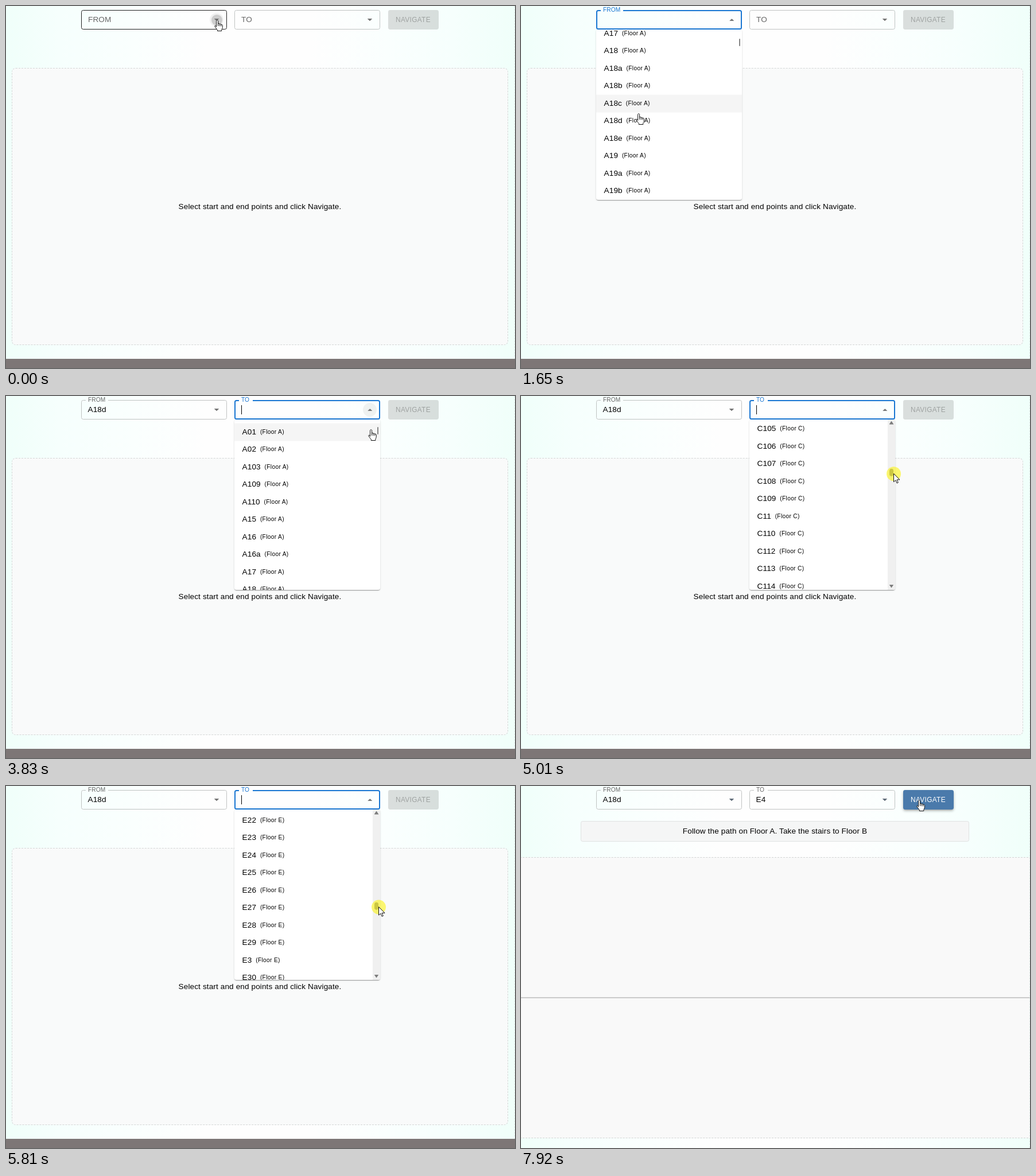
These frames come from a looping animation (887 px wide and 631 px high, 7.99 s). An HTML page:

```html
<!DOCTYPE html>
<html lang="en">
<head>
<meta charset="utf-8">
<title>Floor navigation</title>
<style>
  html, body { margin: 0; width: 100%; height: 100%; overflow: hidden; }
  body {
    position: relative;
    font: 13.56px/20px "Liberation Sans", Arial, sans-serif;
    letter-spacing: .127px;
    color: #000;
    background: linear-gradient(90deg, #f0fffa 0, #f6fffd 92px, #fafffe 220px, #fefefe 350px, #fefefe 530px, #fafffe 665px, #f6fffd 780px, #f0fffa 887px);
  }
  body * { position: absolute; box-sizing: border-box; white-space: nowrap; }
  [hidden] { display: none !important; }
  .edge { left: 886px; top: 0; height: 631px; border-left: 1px dashed #dde8e5; }
  .stage {
    left: 10px; top: 108px; width: 865px; height: 483px;
    border: 1px dashed #d4d6d6; border-radius: 7px; background: #f9fafa;
  }
  .stage p { margin: 0; left: 0; right: 0; top: 231px; text-align: center; }
  .foot { left: 0; top: 615px; width: 887px; height: 16px; background: #7d7676; }
  .route {
    left: 104px; top: 61px; width: 677px; height: 36px; line-height: 34px; text-align: center;
    background: #f5f6f6; border: 1px solid #e0e2e2; border-radius: 3.4px;
  }
  .map {
    left: -2px; top: 124px; width: 891px; height: 490px;
    background: #f9f9f9; border: 1px dashed #d2d4d4;
  }
  .map i { left: 0; top: 243px; width: 100%; height: 2px; background: #cbcbcb; }

  .field { top: 7px; width: 254px; height: 34px; }
  .box { inset: 0; border: 1px solid #c0c3c2; border-radius: 3.5px; }
  .hover .box { border-color: #212121; }
  .focus .box { border: 2px solid #1976d2; }
  .notch .box {
    clip-path: polygon(0 0, 8px 0, 8px 4px, var(--gap) 4px, var(--gap) 0, 100% 0, 100% 100%, 0 100%);
  }
  .label { left: 12px; top: 7px; transform-origin: 0 50%; color: #666; }
  .focus .label { color: #1976d2; }
  .value { left: 11.5px; top: 7px; }
  .caret { top: 9px; width: 1px; height: 16px; background: #000; }
  .halo, .ripple { border-radius: 50%; }
  .halo { left: 224px; top: 5px; width: 24px; height: 24px; background: rgba(0,0,0,.05); }
  .ripple { left: 226.5px; top: 7.5px; width: 19px; height: 19px; background: rgba(0,0,0,.15); }
  .tri { left: 231.7px; top: 15px; width: 8.6px; height: 4.3px; background: #757575; clip-path: polygon(0 0, 100% 0, 50% 100%); }
  .open .tri { transform: scaleY(-1); }
  .done .tri { background: #5f6b78; }

  .go {
    left: 665.5px; top: 7px; width: 88px; height: 34px; line-height: 34px; text-align: center;
    font-size: 11.87px; letter-spacing: .34px; border-radius: 3.4px;
    background: rgba(0,0,0,.13); color: rgba(0,0,0,.27);
  }
  .go.on {
    background: #4a7aab; color: #fff;
    box-shadow: 0 2px 3px -1px rgba(0,0,0,.2), 0 3px 4px rgba(0,0,0,.14), 0 1px 6px rgba(0,0,0,.1);
  }

  .list {
    top: 41px; width: 254px; height: 297px; overflow: hidden; background: #fff; border-radius: 3.4px;
    box-shadow: 0 2px 1px -1px rgba(0,0,0,.2), 0 1px 1px rgba(0,0,0,.14), 0 1px 3px rgba(0,0,0,.14);
  }
  .row { left: 0; top: 0; width: 254px; height: 30.5px; padding-left: 13.6px; display: flex; align-items: center; }
  .row.hot { background: #f5f5f5; }
  .row * { position: static; }
  .row small { margin-left: 6.8px; font-size: 10.17px; letter-spacing: .339px; }
  .bar { right: 0; top: 0; width: 13px; height: 297px; }
  .bar.wide { background: #f0f0f0; }
  .bar u { display: none; left: 2.5px; width: 8px; height: 6px; background: #7c7c7c; }
  .bar.wide u { display: block; }
  .up { top: 2.5px; clip-path: polygon(0 100%, 50% 0, 100% 100%); }
  .down { top: 287.5px; clip-path: polygon(0 0, 100% 0, 50% 100%); }
  .thumb { left: 8px; top: 0; width: 2px; height: 12.5px; border-radius: 1px; background: #868686; }
  .wide .thumb { left: 3px; width: 7px; border-radius: 3.5px; }

  .press { left: -12px; top: -12px; width: 25px; height: 25px; border-radius: 50%; background: rgba(252,244,20,.6); }
  #pointer { left: 0; top: 0; }
  #pointer svg { overflow: visible; fill: #fff; stroke: #111; stroke-linejoin: round; stroke-linecap: round; width: 16px; height: 21px; }
  #hand { left: -5px; top: 0; }
  #arrow { left: 0; top: 0; }
</style>
</head>
<body>
<div class="edge"></div>
<div id="idle">
  <div class="stage"><p>Select start and end points and click Navigate.</p></div>
  <div class="foot"></div>
</div>
<div id="result" hidden>
  <div class="route">Follow the path on Floor A. Take the stairs to Floor B</div>
  <div class="map"><i></i></div>
  <div class="edge"></div>
</div>
<div class="go" id="go">NAVIGATE</div>
<div class="list" id="list" hidden>
  <div class="bar" id="bar"><u class="up"></u><u class="down"></u><div class="thumb" id="thumb"></div></div>
</div>
<div id="pointer">
  <div class="press" id="press"></div>
  <svg id="hand" viewBox="0 0 16 21">
    <path d="M3.6 12V2.2C3.6.2 6.6.2 6.6 2.2V7C7 6 9.2 6.2 9.2 7.7 9.8 6.8 11.7 7.1 11.8 8.5 12.5 7.8 14.3 8.2 14.3 9.8V13.3C14.3 15 13 16.2 12.8 17.4V19.5H5.3V17.6C4 16.2 2.2 13.7.9 11.8.2 10.6 1.5 9.6 2.5 10.6Z"/>
    <path fill="none" d="M6.6 7V10.5M9.2 7.7V10.8M11.8 8.5V11"/>
  </svg>
  <svg id="arrow" viewBox="0 0 16 21">
    <path d="M.5.5V14.6L3.8 11.6 6.1 16.8 8.3 15.8 6 10.8H10.6Z"/>
  </svg>
</div>
<script>
const LOOP = 7990, ROW = 30.5, PAD = 6.5, VIEW = 297, TOP = 41;
const $ = id => document.getElementById(id);
const within = (t, a, b) => t >= a && t < b;
const clamp = v => Math.min(1, Math.max(0, v));
const smooth = v => v * v * (3 - 2 * v);

// Room names: plain string order, floor by floor
const count = (floor, from, to) =>
  Array.from({ length: to - from + 1 }, (_, i) => floor + (from + i));
const rooms = [
  ..."A01 A02 A103 A109 A110 A15 A16 A16a A17 A18 A18a A18b A18c A18d A18e A19 A19a A19b D2a".split(" "),
  ...count("A", 2, 9), ...count("A", 20, 99), ...count("B", 1, 90),
  ...count("C", 1, 138).filter(r => r !== "C111"),
  ...count("D", 1, 57), ...count("E", 1, 110), ...count("F", 1, 115), ...count("G", 1, 115)
].sort();
const maxScroll = rooms.length * ROW + 2 * PAD - VIEW;
const scrollTo = (room, y) => TOP + PAD + (rooms.indexOf(room) + .5) * ROW - y;

const path = [
  [0, 368, 24], [250, 368, 24], [450, 386, 44], [820, 300, 150], [1150, 212, 180],
  [1580, 205, 183], [1650, 205, 187], [1720, 205, 187], [1850, 208, 193], [2050, 208, 193],
  [2260, 205, 189], [2460, 205, 189], [2880, 636, 21], [3560, 636, 21], [3830, 636, 58],
  [3970, 636, 58], [4300, 649, 62], [4580, 649, 62], [5010, 649, 135], [5410, 649, 186],
  [5900, 649, 216], [6150, 630, 224], [6500, 510, 222], [6820, 463, 197], [7130, 463, 197],
  [7680, 694, 24], [LOOP, 694, 24]
];
const drag = [
  [4580, 0], [5010, scrollTo("C105", 69)], [5410, scrollTo("D26", 73.5)], [5900, scrollTo("E36", 74.5)]
];
const presses = [[60, 200], [2050, 2120], [3490, 3600], [4580, 5960], [7030, 7100], [7710, 7850]];

function sample(keys, t, ease = v => v) {
  let i = 0;
  while (i < keys.length - 2 && t >= keys[i + 1][0]) i++;
  const a = keys[i], b = keys[i + 1];
  const k = ease(clamp((t - a[0]) / (b[0] - a[0])));
  return a.slice(1).map((v, n) => v + (b[n + 1] - v) * k);
}
const pointerAt = t => sample(path, Math.max(0, t), within(t, 4580, 5900) ? undefined : smooth);
const wheel = t => [890, 1100, 1310].reduce((s, at) => s + 86.3 * smooth(clamp((t - at) / 160)), 0);

function makeField(name, left, gap) {
  const el = document.createElement("div");
  el.className = "field";
  el.style.left = left + "px";
  el.style.setProperty("--gap", gap + "px");
  const parts = { el };
  for (const part of ["box", "halo", "ripple", "tri", "label", "value", "caret"]) {
    parts[part] = el.appendChild(document.createElement("div"));
    parts[part].className = part;
  }
  parts.label.textContent = name;
  document.body.insertBefore(el, $("go"));
  return parts;
}

function drawField(f, s) {
  for (const c of ["hover", "focus", "open", "done"]) f.el.classList.toggle(c, !!s[c]);
  f.el.classList.toggle("notch", s.lift > 0);
  const k = 1 - (1 - s.lift) ** 3;
  f.label.style.transform = `translateY(${-17.3 * k}px) scale(${1 - .25 * k})`;
  f.value.textContent = s.value;
  f.caret.hidden = !s.focus || (s.t - s.blink) % 1060 >= 530;
  f.caret.style.left = (s.value ? 44 : 12) + "px";
  f.halo.hidden = !s.halo;
  f.ripple.hidden = !s.ripple;
}

const fromField = makeField("FROM", 131, 47);
const toField = makeField("TO", 398, 32);
const rows = Array.from({ length: 11 }, () => {
  const el = document.createElement("div");
  el.className = "row";
  el.append(document.createElement("span"), document.createElement("small"));
  $("list").insertBefore(el, $("bar"));
  return el;
});

function drawList(t, fromOpen, toOpen) {
  $("list").hidden = !fromOpen && !toOpen;
  if ($("list").hidden) return;
  const scroll = fromOpen ? wheel(t) : sample(drag, t)[0];
  const wide = within(t, 4240, 6080);
  const [px, py] = pointerAt(t - 70);
  const inside = py > TOP && !(wide && px > 639);
  const hot = inside ? Math.floor((py - TOP - PAD + scroll) / ROW) : -1;
  const first = Math.max(0, Math.floor((scroll - PAD) / ROW));
  $("list").style.left = (fromOpen ? 131 : 398) + "px";
  rows.forEach((el, i) => {
    const n = first + i, room = rooms[n];
    el.firstChild.textContent = room;
    el.lastChild.textContent = `(Floor ${room[0]})`;
    el.style.transform = `translateY(${PAD + n * ROW - scroll}px)`;
    el.classList.toggle("hot", n === hot);
  });
  $("bar").classList.toggle("wide", wide);
  $("thumb").style.transform = `translateY(${13 + 258 * scroll / maxScroll}px)`;
}

function draw(t) {
  const done = t >= 7850;
  const fromOpen = within(t, 200, 2120), toOpen = within(t, 3620, 7100);
  drawField(fromField, {
    t, done, open: fromOpen, hover: t < 60, focus: within(t, 60, 3490),
    lift: clamp((t - 60) / 200), value: t < 2120 ? "" : "A18d",
    blink: t < 2120 ? 40 : 2120, halo: t < 420, ripple: t < 250
  });
  drawField(toField, {
    t, done, open: toOpen, hover: within(t, 2760, 3490), focus: within(t, 3490, 7850),
    lift: clamp((t - 3490) / 200), value: t < 7100 ? "" : "E4",
    blink: t < 7100 ? 3490 : 7100, halo: within(t, 2800, 3970), ripple: within(t, 3490, 3700)
  });
  // The caret after the short room name sits closer to the left
  if (t >= 7100) toField.caret.style.left = "29px";
  drawList(t, fromOpen, toOpen);
  $("go").classList.toggle("on", t >= 7100);
  $("idle").hidden = done;
  $("result").hidden = !done;

  const [x, y] = pointerAt(t);
  const arrow = within(t, 2130, 2780) || within(t, 4240, 6080) || within(t, 7130, 7600);
  $("pointer").style.transform = `translate(${x}px, ${y}px)`;
  $("hand").style.display = arrow ? "none" : "";
  $("arrow").style.display = arrow ? "" : "none";
  $("press").hidden = !presses.some(([a, b]) => within(t, a, b));
}

const start = performance.now();
function tick() {
  draw((performance.now() - start) % LOOP);
  requestAnimationFrame(tick);
}
tick();
</script>
</body>
</html>
```
